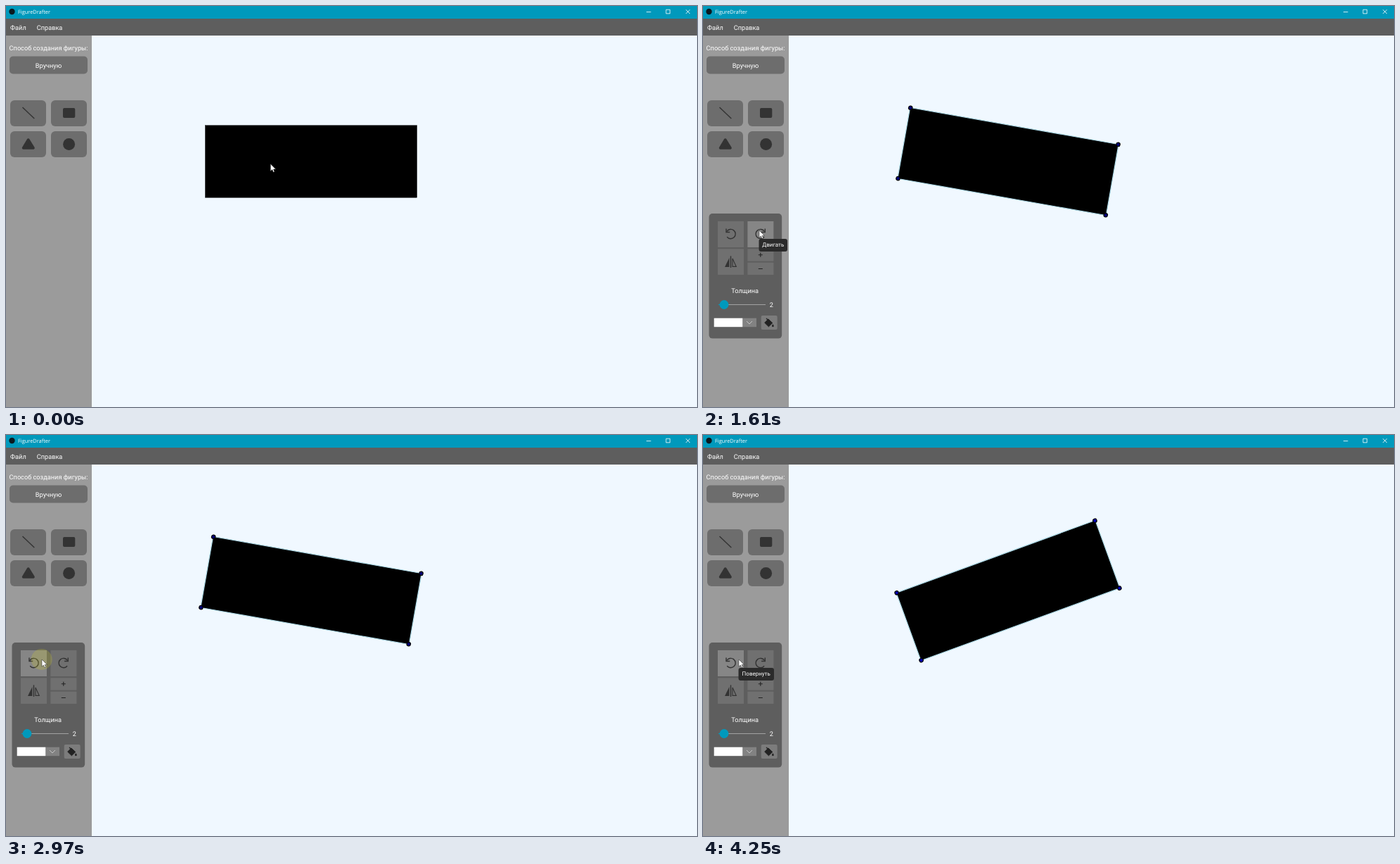
These frames come from a looping animation (983 by 570 pixels, 4380 ms). An HTML page:

```html
<!DOCTYPE html>
<html lang="ru">
<head>
<meta charset="utf-8">
<title>FigureDrafter</title>
<style>
  html, body { margin: 0; width: 100%; height: 100%; overflow: hidden; background: #f0f8ff; }
  svg { display: block; width: 983px; height: 570px; }
  text { font: 9.2px Roboto, "Noto Sans", sans-serif; fill: #fff; text-rendering: geometricPrecision; }
  .mid { text-anchor: middle; }
  .title { font: 7.4px "Open Sans", "Noto Sans", sans-serif; }
  .tip text { font-size: 8px; }
  .tip rect { fill: #2b2b2b; }
  .key { fill: #6d6d6d; }
  .tool { fill: #707070; }
  .hover { fill: #868686; }
  .ink { fill: #333; }
  .pen { fill: none; stroke: #333; stroke-width: 1.4; }
  .win { fill: none; stroke: #fff; stroke-width: .8; }
  #dots { stroke: #000; stroke-width: 1.2; }
</style>
</head>
<body>
<svg viewBox="0 0 983 570">
  <defs>
    <g id="turn">
      <path class="pen" d="M33.8 320.5A6.7 6.7 0 1 1 34.2 328.2"/>
      <path class="pen" d="M33 316.4V321.5H38.2"/>
    </g>
  </defs>

  <rect width="983" height="570" fill="#f0f8ff"/>
  <rect y="42" width="122" height="528" fill="#9b9b9b"/>
  <rect y="18" width="983" height="24" fill="#5e5e5e"/>
  <rect width="983" height="18" fill="#0099bc"/>
  <circle cx="8.5" cy="8" r="4.2" fill="#0b1a20"/>
  <text class="title" x="17" y="11">FigureDrafter</text>
  <path class="win" d="M911 8.5h6.5M939 5.2h5.6v5.6h-5.6zM967.2 5.2l5.8 5.8M973 5.2l-5.8 5.8"/>
  <text x="6" y="34">Файл</text>
  <text x="43.7" y="34">Справка</text>

  <text class="mid" x="60.5" y="63">Способ создания фигуры:</text>
  <rect class="key" x="5" y="71.5" width="111" height="25" rx="5"/>
  <text class="mid" x="60.5" y="87.5">Вручную</text>
  <g class="key">
    <rect x="6" y="134" width="51" height="37" rx="6"/>
    <rect x="64" y="134" width="51" height="37" rx="6"/>
    <rect x="6" y="178" width="51" height="37" rx="6"/>
    <rect x="64" y="178" width="51" height="37" rx="6"/>
  </g>
  <path class="pen" d="M23.5 144L40.3 160"/>
  <rect class="ink" x="81" y="145" width="17.3" height="14" rx="2"/>
  <path class="ink" d="M31.7 190.3L38.8 201.8H24.8Z" stroke="#333" stroke-width="4" stroke-linejoin="round"/>
  <circle class="ink" cx="89.6" cy="196.4" r="8.5"/>

  <g id="panel">
    <rect x="8.5" y="295" width="103.7" height="177.6" rx="5" fill="#5e5e5e"/>
    <rect id="left" class="tool" x="21" y="306" width="37" height="37"/>
    <rect id="right" class="tool" x="63.4" y="306" width="37" height="37"/>
    <rect class="tool" x="21" y="345.3" width="37" height="36.7"/>
    <rect class="tool" x="63.4" y="345.3" width="37" height="17.4"/>
    <rect class="tool" x="63.4" y="364.7" width="37" height="17.4"/>
    <use href="#turn"/>
    <use href="#turn" transform="translate(121.3 0) scale(-1 1)"/>
    <path class="ink" d="M37.4 358V371H31Z"/>
    <path class="pen" stroke-width="1.2" d="M39.5 355.4V372"/>
    <path class="pen" style="stroke-width:1.1" d="M42 359V370.4H47.3Z"/>
    <path class="pen" style="stroke:#222;stroke-width:1.1" d="M78.8 353.8h6M81.8 350.8v6M78.8 373.5h6"/>
    <text class="mid" x="59.7" y="407.5">Толщина</text>
    <path d="M22 424.5H89" stroke="#a2a2a2" stroke-width="1.2"/>
    <path d="M22 424.5H30" stroke="#0099bc" stroke-width="1.2"/>
    <circle cx="30" cy="424.5" r="6.4" fill="#0099bc"/>
    <text x="94.7" y="428">2</text>
    <rect x="56" y="443.7" width="20" height="12.5" fill="#828282"/>
    <rect x="15.7" y="443.7" width="40.5" height="12.5" fill="#fff"/>
    <path d="M62 448L66 452L70 448" fill="none" stroke="#ccc" stroke-width=".9"/>
    <rect x="82.7" y="440" width="23" height="20" rx="2" fill="#7c7c7c"/>
    <path d="M92.8 445L98.8 450.6L93.4 455.8L87.7 450.2Z" fill="#222" stroke="#222" stroke-linejoin="round"/>
    <path d="M90 444L93.5 447.4" stroke="#222" stroke-width="1.2"/>
    <path d="M99.4 452.2q2.8 3.6 0 4q-2.8-.4 0-4z" fill="#222"/>
  </g>

  <g id="shape">
    <rect id="body" x="-150.6" y="-51.3" width="301.2" height="102.6"/>
    <g id="dots">
      <circle cx="-150" cy="-51" r="2.7"/>
      <circle cx="150" cy="-51" r="2.7"/>
      <circle cx="150" cy="51" r="2.7"/>
      <circle cx="-150" cy="51" r="2.7"/>
    </g>
  </g>

  <circle id="pulse" fill="#e0da20"/>
  <g id="tipRight" class="tip">
    <rect x="79.5" y="331" width="40.5" height="18" rx="3"/>
    <text class="mid" x="99.8" y="342.4">Двигать</text>
  </g>
  <g id="tipLeft" class="tip">
    <rect x="50.5" y="331" width="50.5" height="18" rx="3"/>
    <text class="mid" x="75.7" y="342.4">Повернуть</text>
  </g>
  <path id="cursor" d="M0 0V10.2L2.4 8L4 11.6L5.7 10.9L4.2 7.4H7.4Z" fill="#fff" stroke="#222" stroke-width=".5"/>
</svg>

<script>
const LOOP = 4380;
const $ = id => document.getElementById(id);
const start = { x: 376.3, y: 224.6, angle: 0, picked: false, pulse: 0, tip: '', dot: '#0000f0' };

// Each step holds until the next one and keeps whatever it does not set.
const steps = [
  [0, {}],
  [530, { picked: true, pulse: 15 }],
  [600, { pulse: 0 }],
  [730, { x: 350, y: 233 }],
  [800, { x: 270, y: 259 }],
  [870, { x: 170, y: 291 }],
  [930, { x: 106, y: 312 }],
  [1000, { x: 84, y: 318.4 }],
  [1070, { x: 82, y: 319 }],
  [1140, { x: 80, y: 319 }],
  [1410, { pulse: 7.5 }],
  [1480, { angle: 10, dot: '#000078' }],
  [1540, { pulse: 0, tip: 'tipRight' }],
  [1940, { pulse: 7.5 }],
  [2010, { pulse: 15, angle: 20 }],
  [2080, { pulse: 0 }],
  [2280, { x: 76 }],
  [2350, { x: 66, tip: '' }],
  [2420, { x: 55 }],
  [2490, { x: 51 }],
  [2900, { pulse: 7.5 }],
  [2970, { pulse: 15, angle: 10 }],
  [3040, { pulse: 0, tip: 'tipLeft' }],
  [3240, { pulse: 15, angle: 0 }],
  [3310, { pulse: 0 }],
  [3580, { pulse: 7.5 }],
  [3650, { pulse: 13, angle: -10 }],
  [3710, { pulse: 16 }],
  [3780, { pulse: 0, dot: '#0000b0' }],
  [3980, { pulse: 7.5 }],
  [4050, { pulse: 13, angle: -20 }],
  [4120, { pulse: 15 }],
  [4250, { pulse: 0 }]
];

const stateAt = t => Object.assign({}, start, ...steps.filter(s => s[0] <= t).map(s => s[1]));

function set(id, attrs) {
  for (const name in attrs) $(id).setAttribute(name, attrs[name]);
}

const show = (id, on) => set(id, { visibility: on ? 'visible' : 'hidden' });

function draw(s) {
  show('panel', s.picked);
  show('dots', s.picked);
  set('dots', { fill: s.dot });
  set('body', { stroke: s.picked ? '#add8e6' : '#000', 'stroke-width': s.picked ? 1.2 : .4 });
  set('shape', { transform: `translate(434 221) rotate(${s.angle})` });

  set('cursor', { transform: `translate(${s.x} ${s.y})` });
  set('pulse', { cx: s.x - .3, cy: s.y, r: s.pulse, opacity: s.pulse > 8 ? (17 - s.pulse) * .1 : .65 });

  const over = x => s.y > 306 && s.x >= x && s.x <= x + 37;
  $('left').classList.toggle('hover', over(21));
  $('right').classList.toggle('hover', over(63.4));
  for (const id of ['tipLeft', 'tipRight']) show(id, s.tip === id);
}

const began = performance.now();
function tick() {
  draw(stateAt((performance.now() - began) % LOOP));
  requestAnimationFrame(tick);
}
tick();
</script>
</body>
</html>
```
